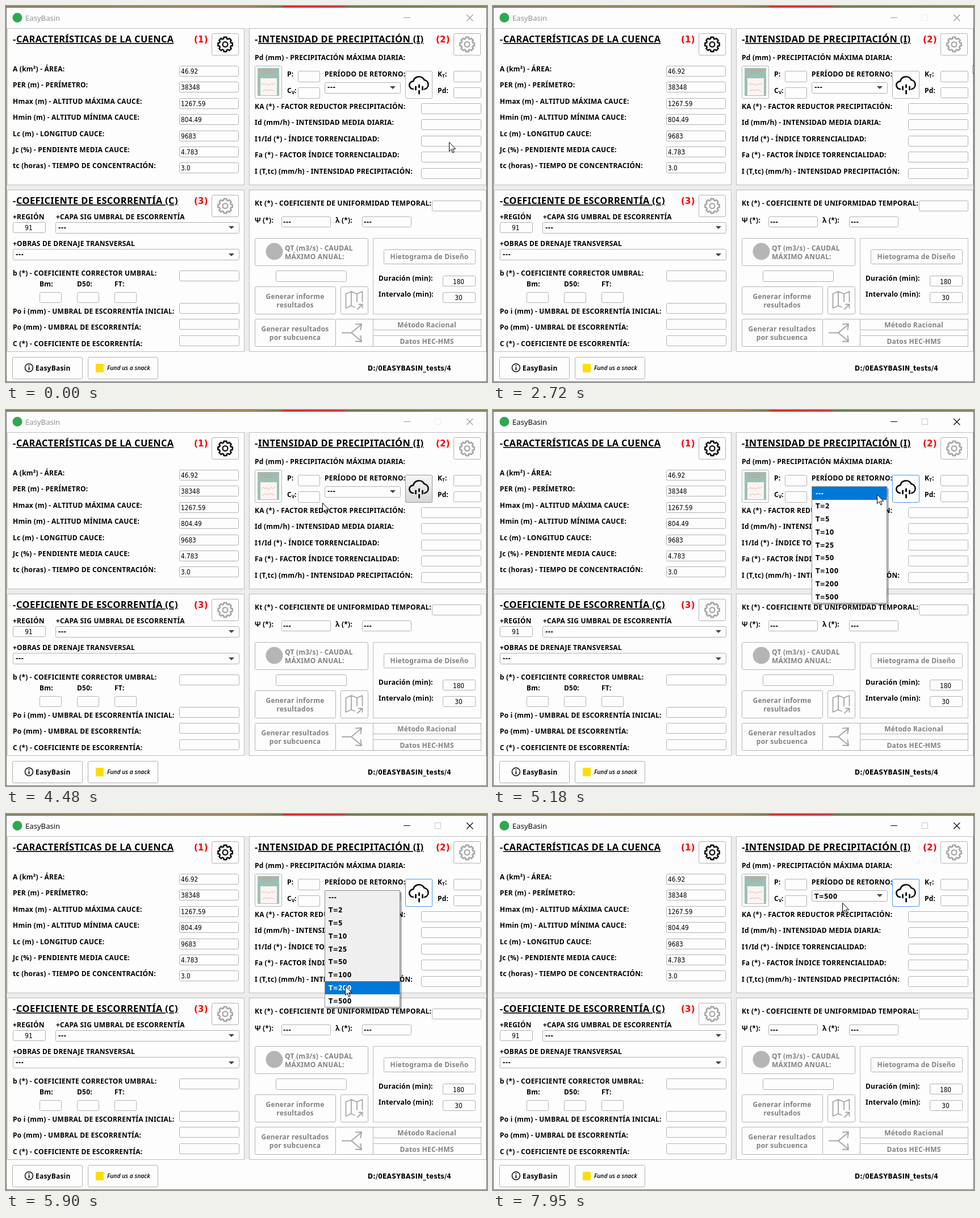
These frames come from a looping animation (847x661 px, 8000 ms). An HTML page:

```html
<!DOCTYPE html>
<html lang="es">
<head>
<meta charset="utf-8">
<title>EasyBasin</title>
<style>
html, body { margin: 0; width: 100%; height: 100%; overflow: hidden; background: #ececec; }
svg { display: block; width: 847px; height: 661px; }
text { font: bold 12px "Noto Sans", "Open Sans", sans-serif; letter-spacing: .22px; fill: #000; white-space: pre; }
text.head { font-size: 16.4px; letter-spacing: .36px; }
text.num, text.red, text.val { font-family: "DejaVu Sans Condensed", "DejaVu Sans", sans-serif; font-stretch: condensed; }
text.num { letter-spacing: .3px; }
text.red { font-size: 16.6px; fill: #f00; }
text.val { font-weight: normal; font-size: 11.7px; letter-spacing: 0; }
text.off { fill: #828282; }
text.mid { text-anchor: middle; }
text.sub { font-size: 8px; }
text.bar { font: 13.2px "Open Sans", "Noto Sans", sans-serif; letter-spacing: 0; }
text.hand { font: italic 600 10.4px "Open Sans", "Noto Sans", sans-serif; letter-spacing: 0; }
.panel { fill: #fdfdfd; stroke: #bdbdbd; }
.field { fill: #fdfdfd; stroke: #b2b2b2; }
.line { fill: none; stroke: currentColor; stroke-linecap: round; stroke-linejoin: round; }
.dark { color: #111; }
.pale { color: #a6a6a6; }
.rose { color: #d98a84; }

.title, .sys, .max, .hover, .focus, .popup, .grey, .pick, .before, .after, .edge, .arrow {
  animation: 8s step-end infinite;
}
.title { animation-name: title; }
.sys { color: #999; animation-name: sys; }
.max { color: #fdfdfd; animation-name: max; }
.hover { animation-name: hover; }
.focus { animation-name: focus; }
.popup { animation-name: popup; }
.grey { animation-name: grey; }
.before { animation-name: before; }
.after { animation-name: after; }
.edge { animation-name: edge; }
.arrow { animation-name: arrow; }
.pick {
  --row: 0;
  clip-path: inset(calc(var(--row) * 22.75px) 0 calc((8 - var(--row)) * 22.75px) 0);
  animation-name: pick;
}
@keyframes title { 0% { fill: #8c8c8c } 63%, 100% { fill: #000 } }
@keyframes sys { 0% { color: #999 } 63%, 100% { color: #000 } }
@keyframes max { 0% { color: #fdfdfd } 28.75% { color: #ececec } 63%, 100% { color: #c8c8c8 } }
@keyframes hover { 0% { opacity: 0 } 51% { opacity: 1 } 63%, 100% { opacity: 0 } }
@keyframes focus { 0% { opacity: 0 } 63%, 100% { opacity: 1 } }
@keyframes popup { 0% { opacity: 0 } 63% { opacity: 1 } 82%, 100% { opacity: 0 } }
@keyframes grey { 0% { opacity: 0 } 68.25%, 100% { opacity: 1 } }
@keyframes before { 0% { opacity: 1 } 82%, 100% { opacity: 0 } }
@keyframes after { 0% { opacity: 0 } 82%, 100% { opacity: 1 } }
@keyframes edge { 0% { opacity: 0 } 33.94% { opacity: 1 } 35.75%, 100% { opacity: 0 } }
@keyframes pick {
  0% { --row: 0 } 66.5% { --row: 1 } 70% { --row: 2 } 71.875% { --row: 4 }
  73.6% { --row: 7 } 75.375%, 100% { --row: 8 }
}
@keyframes arrow {
  0% { transform: translate(780px, 239px) }
  1.875% { transform: translate(780px, 239px); animation-timing-function: steps(2, start) }
  5.27% { transform: translate(700px, 229px); animation-timing-function: steps(2, start) }
  8.66% { transform: translate(621px, 285px); animation-timing-function: steps(2, start) }
  12.05% { transform: translate(740px, 347px); animation-timing-function: step-start }
  13.75% { transform: translate(836px, 345px); animation-timing-function: step-start }
  15.25% { transform: translate(815px, 340px); animation-timing-function: step-start }
  17% { transform: translate(751px, 372px); animation-timing-function: steps(3, start) }
  22.125% { transform: translate(547px, 349px); animation-timing-function: steps(2, start) }
  25.3% { transform: translate(383px, 230px); animation-timing-function: steps(2, start) }
  28.75% { transform: translate(430px, 30px); animation-timing-function: step-start }
  30.5% { transform: translate(590px, 21px); animation-timing-function: steps(2, start) }
  33.94% { transform: translate(835px, 62px); animation-timing-function: step-start }
  35.75% { transform: translate(850px, 105px); animation-timing-function: steps(2, start) }
  39.125% { transform: translate(720px, 296px); animation-timing-function: steps(2, start) }
  43% { transform: translate(412px, 180px); animation-timing-function: steps(2, start) }
  46.25% { transform: translate(470px, 11px); animation-timing-function: steps(2, start) }
  49.5% { transform: translate(738px, 100px); animation-timing-function: steps(3, start) }
  54.375% { transform: translate(600px, 256px); animation-timing-function: steps(2, start) }
  57.6% { transform: translate(557px, 163px) }
  57.875% { transform: translate(557px, 163px); animation-timing-function: steps(3, start) }
  63% { transform: translate(676px, 148px) }
  66.5% { transform: translate(676px, 148px); animation-timing-function: steps(3, start) }
  71.75% { transform: translate(645px, 186px) }
  71.875% { transform: translate(645px, 186px); animation-timing-function: steps(2, start) }
  75.375% { transform: translate(597px, 302px); animation-timing-function: steps(2, start) }
  78.4% { transform: translate(584px, 328px) }
  82% { transform: translate(584px, 328px); animation-timing-function: steps(4, start) }
  89.06% { transform: translate(560px, 240px); animation-timing-function: steps(4, start) }
  96.1% { transform: translate(532px, 146px) }
  96.25% { transform: translate(532px, 146px); animation-timing-function: steps(3, start) }
  100% { transform: translate(615px, 156px) }
}
</style>
</head>
<body>
<svg id="stage" viewBox="0 0 847 661"></svg>
<script>
const rect = (x, y, w, h, attrs) => `<rect x="${x}" y="${y}" width="${w}" height="${h}" ${attrs}/>`;
const box = (x1, y1, x2, y2, cls = 'field', r = 2) =>
  rect(x1 + .5, y1 + .5, x2 - x1 - 1, y2 - y1 - 1, `rx="${r}" class="${cls}"`);
const text = (x, y, str, cls = '') => `<text x="${x}" y="${y}" class="${cls}">${str}</text>`;
const line = (d, w = 2, cls = '') => `<path d="${d}" class="line ${cls}" stroke-width="${w}"/>`;
const caret = (x, y) => `<path d="M${x - 5} ${y - 2}h10l-5 5z" fill="#444"/>`;
const dashes = (x, y) => text(x, y, '---', 'num');
const head = (x, y, str, num, numX) =>
  text(x, y, '-', 'head') + `<text x="${x + 6}" y="${y}" class="head" text-decoration="underline">${str}</text>` +
  text(numX, y, `(${num})`, 'red');

// Eight-toothed wheel: a filled silhouette with a smaller one cut from it.
const wheel = (tooth, reach, r, fill) => `<g fill="${fill}"><circle r="${r}"/>` + [0, 45, 90, 135].map(a =>
  rect(-tooth, -reach, tooth * 2, reach * 2, `rx="2" transform="rotate(${a})"`)).join('') + '</g>';
const gear = (x, y, cls) => box(x, y, x + 48, y + 39) +
  `<g class="${cls}" transform="translate(${x + 24} ${y + 19.5})">` + wheel(4, 14, 11.4, 'currentColor') +
  wheel(1.8, 11.6, 9.2, '#fdfdfd') + '<circle r="4.4" class="line" stroke-width="2.3"/></g>';

const frame =
  rect(0, 0, 847, 661, 'fill="url(#map)"') +
  rect(.5, 2.5, 846, 658, 'fill="#ececec" stroke="#6c6c6c"') +
  rect(1, 3, 845, 36, 'fill="#fdfdfd"') + rect(1, 607, 845, 53, 'fill="#fdfdfd"') +
  '<circle cx="20" cy="20.5" r="8.5" fill="#2fa84f"/>' + text(34, 26, 'EasyBasin', 'bar title') +
  `<g class="sys">${line('M700.5 20.5h11M811.5 15.5l10.5 10.5M822 15.5l-10.5 10.5', 1.1)}</g>` +
  `<g class="max">${line('M755.5 15.5h10v10h-10z', 1)}</g>` +
  box(2, 39, 420, 315, 'panel', 0) + box(428, 39, 846, 315, 'panel', 0) +
  box(2, 323, 420, 608, 'panel', 0) + box(428, 323, 846, 608, 'panel', 0);

const traits = [
  ['A (km²) - ÁREA:', '46.92'], ['PER (m) - PERÍMETRO:', '38348'],
  ['Hmax (m) - ALTITUD MÁXIMA CAUCE:', '1267.59'], ['Hmin (m) - ALTITUD MÍNIMA CAUCE:', '804.49'],
  ['Lc (m) - LONGITUD CAUCE:', '9683'], ['Jc (%) - PENDIENTE MEDIA CAUCE:', '4.783'],
  ['tc (horas) - TIEMPO DE CONCENTRACIÓN:', '3.0']
];
const basin = head(12, 64, 'CARACTERÍSTICAS DE LA CUENCA', 1, 331) + gear(362, 48, 'dark') +
  traits.map(([label, value], i) => {
    const y = Math.round(105 + i * 28.4);
    return text(12, y + 10, label) + box(305, y, 410, y + 19) + text(308, y + 14, value, 'val');
  }).join('');

const factors = ['KA (*) - FACTOR REDUCTOR PRECIPITACIÓN:', 'Id (mm/h) - INTENSIDAD MEDIA DIARIA:',
  'I1/Id (*) - ÍNDICE TORRENCIALIDAD:', 'Fa (*) - FACTOR ÍNDICE TORRENCIALIDAD:',
  'I (T,tc) (mm/h) - INTENSIDAD PRECIPITACIÓN:'];
const book = box(438, 105, 486, 163) + rect(443, 109, 38, 49, 'fill="#9cc0b3"') +
  rect(448, 127, 29, 30, 'fill="#fbf4f2"') + line('M447 113.5h30M454 118h16', .8, 'rose') +
  line('M450 139l3-3 3 2 4-1 3 3 4-4 3 2 4-3M452 150l5-3 4 2 6-2 5 3', .6, 'rose');
const cloud = box(703, 114, 751, 163) +
  `<g class="hover">${rect(703.5, 114.5, 47, 48, 'rx="2" fill="url(#shade)" stroke="#9a9a9a"')}</g>` +
  `<g class="focus">${rect(703.5, 114.5, 47, 48, 'rx="2" fill="#fdfdfd" stroke="#4a9be8"')}</g>` +
  '<g class="dark">' + line('M717 146a6.8 6.8 0 0 1 .2-13.6a10.3 10.3 0 0 1 19.3-2.4a8.3 8.3 0 0 1 .5 16.3', 2.7) +
  line('M721.5 142v5M727.5 139v4M727.5 149v5M733.5 142v5', 2.9) + '</g>';
const rain = head(438, 64, 'INTENSIDAD DE PRECIPITACIÓN (I)', 2, 757) + gear(788, 48, 'pale') +
  text(438, 95, 'Pd (mm) - PRECIPITACIÓN MÁXIMA DIARIA:') + book +
  text(495, 124, 'P:') + box(514, 114, 553, 134) +
  text(495, 153, 'C') + text(503, 155, 'V', 'sub') + text(508, 153, ':') + box(514, 143, 553, 163) +
  text(561, 124, 'PERÍODO DE RETORNO:') + box(561, 134, 695, 154) + caret(681, 143) +
  `<g class="before">${dashes(566, 147)}</g><g class="after">${text(566, 149, 'T=500', 'num')}</g>` + cloud +
  text(760, 124, 'K') + text(768, 126, 'T', 'sub') + text(773, 124, ':') + box(788, 114, 837, 134) +
  text(760, 153, 'Pd:') + box(788, 143, 837, 162) +
  factors.map((label, i) => {
    const y = Math.round(171 + i * 28.4);
    return text(438, y + 10, label) + box(731, y, 837, y + 19);
  }).join('');

const limits = ['Po i (mm) - UMBRAL DE ESCORRENTÍA INICIAL:', 'Po (mm) - UMBRAL DE ESCORRENTÍA:',
  'C (*) - COEFICIENTE DE ESCORRENTÍA:'];
const runoff = head(12, 348, 'COEFICIENTE DE ESCORRENTÍA (C)', 3, 331) + gear(362, 332, 'pale') +
  text(12, 375, '+REGIÓN') + box(12, 380, 70, 399) + text(40, 394, '91', 'val mid') +
  text(88, 375, '+CAPA SIG UMBRAL DE ESCORRENTÍA') + box(87, 380, 411, 400) + dashes(92, 394) + caret(397, 389) +
  text(12, 422, '+OBRAS DE DRENAJE TRANSVERSAL') + box(12, 427, 411, 447) + dashes(17, 441) + caret(397, 437) +
  text(12, 474, 'b (*) - COEFICIENTE CORRECTOR UMBRAL:') + box(305, 465, 411, 484) +
  [['Bm:', 59], ['D50:', 125], ['FT:', 191]].map(([label, x]) =>
    text(x, 493, label) + box(x, 503, x + 39, 522)).join('') +
  limits.map((label, i) => {
    const y = Math.round(522 + i * 28.4);
    return text(12, y + 19, label) + box(305, y, 411, y + 19);
  }).join('');

const off = (x, y, str) => text(x, y, str, 'off mid');
const results = text(438, 351, 'Kt (*) - COEFICIENTE DE UNIFORMIDAD TEMPORAL:') + box(750, 342, 837, 361) +
  text(438, 381, 'Ψ (*):') + box(485, 370, 572, 389) + dashes(488, 384) +
  text(580, 381, 'λ (*):') + box(627, 370, 714, 389) + dashes(630, 384) +
  box(438, 408, 638, 457) + '<circle cx="472.5" cy="431.5" r="15" fill="#b5b5b5"/>' +
  text(491, 430, 'QT (m3/s) - CAUDAL', 'off') + text(491, 445, 'MÁXIMO ANUAL:', 'off') + box(475, 465, 600, 485) +
  box(438, 493, 581, 542) + off(509, 515, 'Generar informe') + off(509, 530, 'resultados') +
  box(589, 493, 638, 542) + '<g class="pale">' +
  line('M598.5 506l9.5-4 10 4 9.5-4v18M598.5 506v25l9.5-4 6 2.5M608 502v25M618 506v14', 1.8) +
  line('M619 533l8.5-8.5M621 524.5h6.5v6.5', 1.8) + '</g>' +
  box(438, 550, 581, 599) + off(509, 572, 'Generar resultados') + off(509, 587, 'por subcuenca') +
  box(580, 550, 647, 599) + '<g class="pale">' +
  line('M592 574.5h16l17-14M608 574.5l17 14M616 559.5l10-.5-1.5 10M616 589.5l10 .5-1.5-10', 1.9) + '</g>' +
  box(646, 408, 837, 542, 'panel', 0) + box(665, 428, 827, 454) + off(745.5, 445, 'Hietograma de Diseño') +
  text(656, 483, 'Duración (min):') + box(769, 474, 827, 493) + text(797, 489, '180', 'val mid') +
  text(656, 511, 'Intervalo (min):') + box(769, 503, 827, 522) + text(797, 517, '30', 'val mid') +
  box(646, 550, 837, 599, 'panel', 0) +
  box(646, 550, 837, 570) + off(741, 565, 'Método Racional') +
  box(646, 579, 837, 599) + off(741, 594, 'Datos HEC-HMS');

const footer = box(11, 617, 135, 656) + '<circle cx="40.5" cy="636" r="7" class="line dark" stroke-width="1.6"/>' +
  line('M40.5 635.5v4M40.5 632.3v.2', 1.9, 'dark') + text(52, 641, 'EasyBasin') +
  box(144, 617, 268, 656) + rect(158, 629, 14, 15, 'fill="#ffdd00"') + text(178, 640, 'Fund us a snack', 'hand') +
  text(637, 641, 'D:/0EASYBASIN_tests/4', 'num');

const periods = ['---', ...[2, 5, 10, 25, 50, 100, 200, 500].map(n => 'T=' + n)];
const rows = ink => periods.map((p, i) =>
  `<text x="568" y="${150.5 + i * 22.75}" class="num" style="fill:${ink}">${p}</text>`).join('');
const popup = '<g class="popup">' + rect(564, 138, 133, 205, 'fill="#000" opacity=".28"') +
  rect(561.5, 134.5, 132, 205, 'fill="#fdfdfd" stroke="#8f8f8f"') +
  rect(562, 135, 131, 182, 'fill="#efefef" class="grey"') + rows('#000') +
  '<g class="pick">' + rect(562, 135, 131, 204.75, 'fill="#0078d7"') + rows('#fff') + '</g></g>';

const pointer = '<path class="edge" d="M845.5 104.5h6v14h-6z" fill="#fff" stroke="#222"/>' +
  '<path class="arrow" d="M.5 .5v16l3.7-3.5 2.6 6 2.3-1-2.5-5.8h5z" fill="#fff" stroke="#000"/>';

const defs = `<defs>
  <linearGradient id="map"><stop stop-color="#8a8468"/><stop offset=".5" stop-color="#a98c5e"/>
    <stop offset=".57" stop-color="#7d7a50"/><stop offset=".58" stop-color="#d22"/><stop offset=".7" stop-color="#c33"/>
    <stop offset=".71" stop-color="#6f7a4c"/><stop offset="1" stop-color="#8f8a5c"/></linearGradient>
  <linearGradient id="shade" x2="0" y2="1"><stop stop-color="#f6f6f6"/><stop offset="1" stop-color="#d6d6d6"/></linearGradient>
</defs>`;

document.getElementById('stage').innerHTML =
  defs + frame + basin + rain + runoff + results + footer + popup + pointer;
</script>
</body>
</html>
```
